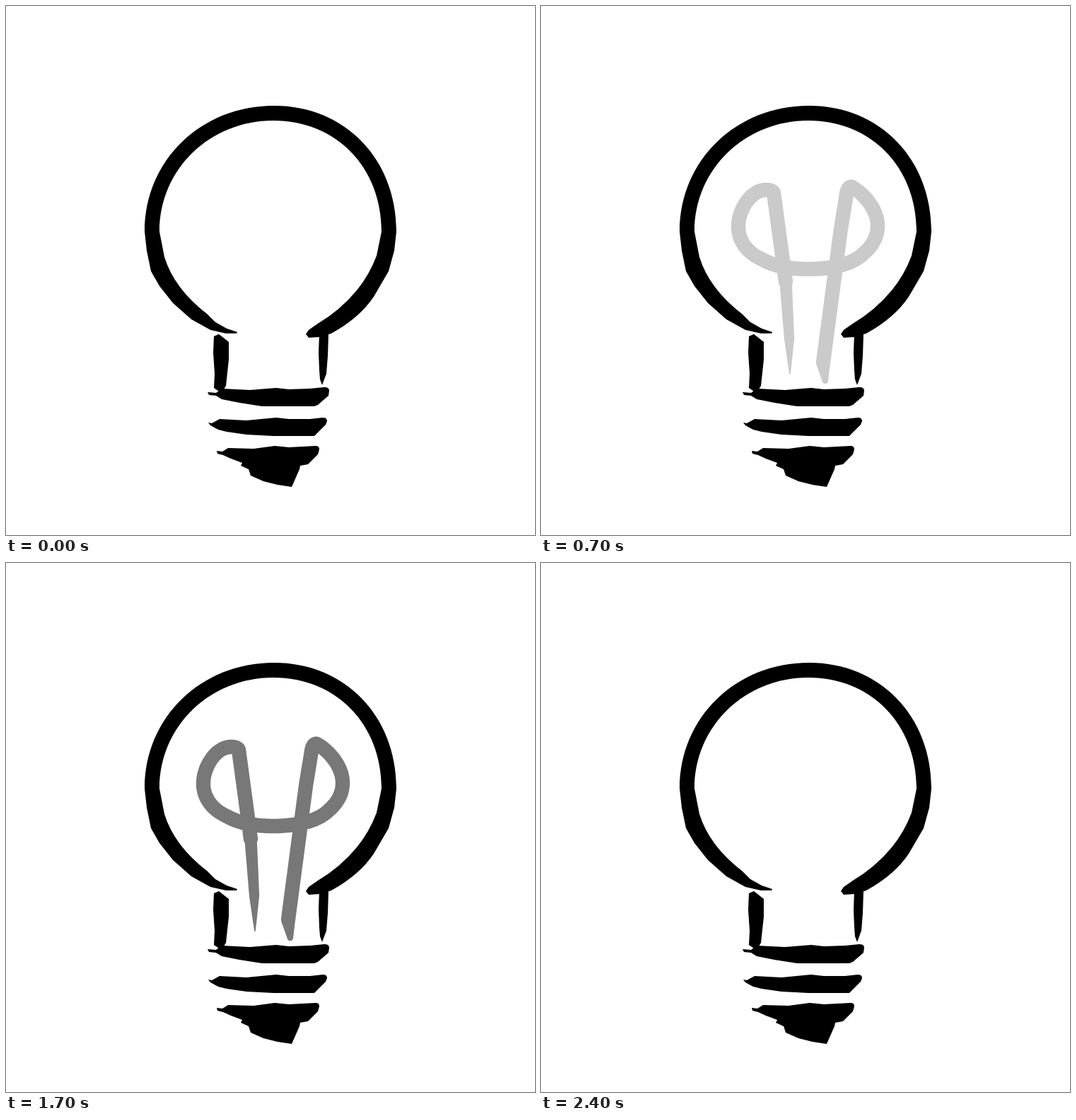
These frames come from a looping animation (748 by 748 pixels, 2.5 s). An HTML page with a canvas:

```html
<!DOCTYPE html>
<html lang="en">
<head>
<meta charset="utf-8">
<title>Light bulb</title>
<style>
html, body { margin: 0; width: 100%; height: 100%; overflow: hidden; background: #fff; }
canvas { display: block; width: 100vw; height: 100vh; }
</style>
</head>
<body>
<canvas id="stage" width="748" height="748"></canvas>
<script>
const ctx = document.getElementById('stage').getContext('2d');
const LOOP = 2500, STEP = 100;
const CX = 374, CY = 319;
const DARK = '#787878', MID = '#a2a2a2', LIGHT = '#cacaca';

// Bulb: glass, neck, screw thread and foot
const bulb = [
  `M326 463 L311 463 L289 458 L262 443 L236 420 L217 396 L205 375 L199 346 L196 319
   C196 218 276 141 379 141 C479 141 552 216 552 319 L549 346 L541 375 L520 411
   Q500 441 460 463 L444 468 L428 469 L424 464 L428 458 L441 449
   Q473 430 496 402 Q514 380 524 353 L531 319
   C531 228 467 162 378 162 C288 162 217 231 217 319
   L224 355 Q238 400 285 436 L296 447 L312 456 L327 461 Z`,
  'M294 467 L301 464 L315 475 L315 500 L311 537 L308 542 L301 545 L294 540 L295 520 L293 490 Z',
  'M443 463 L456 463 L455 495 L453 520 L447 536 L444 528 L443 515 L442 490 Z',
  `M285 546 L297 547 L305 541 L345 543 L382 540 L400 542 L430 541 L450 539 Q457 539 457 544
   L456 551 L441 564 L436 566 L362 566 L330 561 L305 556 L297 551 L287 550 Z`,
  `M286 589 L291 590 L302 584 L340 586 L382 582 L400 584 L430 584 L448 582 Q454 582 454 587
   L452 592 L436 608 L378 608 L340 606 L312 602 L300 599 L289 593 Z`,
  `M298 629 L306 630 L314 625 L350 626 L380 622 L400 624 L438 622 Q443 622 443 627 L441 634
   L427 648 L416 650 L415 655 L404 680 L384 677 L364 672 L346 664 L343 655 L332 650
   L334 646 L318 640 L307 635 L299 633 Z`
].map(d => new Path2D(d));

// Filament, drawn as a brush ribbon along one path
const wire = document.createElementNS('http://www.w3.org/2000/svg', 'path');
wire.setAttribute('d', `M352 520 L351 470 L346 390 L329 264 Q327 260 318 260
  C297 260 279 288 279 312 C279 334 294 350 312 358 C330 368 352 372 378 372
  C408 372 440 366 456 350 C470 338 476 325 476 311 C476 290 460 268 440 256
  Q434 254 432 266 L424 315 L399 504 L402 531`);
const LEN = wire.getTotalLength();
const drawn = [0, 130, 270, 408, 560, 720, LEN];
const erased = [266, 400, 545, 705, LEN];

// Inner end and tip of each ray
const rays = [
  [174, 396, 133, 409], [156, 320, 108, 321], [169, 236, 131, 221],
  [204, 170, 171, 136], [278, 122, 265, 81], [375, 103, 377, 58],
  [472, 123, 487, 82], [549, 174, 580, 140], [582, 238, 620, 226],
  [592, 319, 639, 324], [571, 398, 612, 414]
];
const rayShape = [[0, -7], [0.05, 8], [0.4, 8], [0.68, 6.5], [1, 1.5], [0.97, -1], [0.78, -5.5], [0.6, -7]];

function brush(s) {
  let r = 10.3;
  if (s < 50) r = 1 + s * 0.125;
  else if (s < 130) r = 7.2 + (s - 50) * 0.02;
  return Math.min(r, 4 + (LEN - s) * 0.23);
}

function filament(from, to, color) {
  const ribbon = new Path2D();
  for (let s = from; s <= to; s += 1.5) {
    const p = wire.getPointAtLength(s);
    let { x, y } = p, r = brush(s);
    if (from > 0) {
      // A cut end thins out toward the inside of the curve
      const q = wire.getPointAtLength(s + 1);
      const tx = q.x - p.x, ty = q.y - p.y;
      const thin = Math.min(r, 1.2 + (s - from) * 0.14);
      const shift = (r - thin) * 0.9;
      x += ty * shift;
      y -= tx * shift;
      r = thin;
      if (s === from) {
        ribbon.moveTo(x - tx * 17, y - ty * 17);
        ribbon.lineTo(x + ty * 2, y - tx * 2);
        ribbon.lineTo(x - ty * 2, y + tx * 2);
        ribbon.closePath();
      }
    }
    ribbon.moveTo(x + r, y);
    ribbon.arc(x, y, r, 0, Math.PI * 2);
  }
  ctx.fillStyle = color;
  ctx.fill(ribbon);
}

function outward(x, y, d) {
  const k = 1 + d / Math.hypot(x - CX, y - CY);
  return [CX + (x - CX) * k, CY + (y - CY) * k];
}

function drawRays(k) {
  ctx.fillStyle = LIGHT;
  rays.forEach(([x0, y0, x1, y1], i) => {
    const brief = i % 2 === 1;
    if (brief && k > 3) return;
    // Low rays fly a little farther
    const push = k * k * (1 + Math.max(0, y0 - CY) / 300);
    const [ax, ay] = outward(x0, y0, (brief ? 4 : 2.5) * push);
    const [bx, by] = outward(x1, y1, 1.94 * push);
    const dx = bx - ax, dy = by - ay, len = Math.hypot(dx, dy);
    const side = i < 8 ? 1 : -1;
    ctx.beginPath();
    for (const [u, v] of rayShape) {
      const n = v * side / len;
      ctx.lineTo(ax + dx * u - dy * n, ay + dy * u + dx * n);
    }
    ctx.fill();
  });
}

function render(t) {
  const n = Math.floor((t % LOOP) / STEP);
  ctx.fillStyle = '#fff';
  ctx.fillRect(0, 0, 748, 748);

  if (n > 0 && n < 7) filament(0, drawn[n], DARK);
  else if (n >= 7 && n < 16) filament(0, LEN, LIGHT);
  else if (n >= 16 && n < 20) filament(0, LEN, n === 16 ? MID : DARK);
  else if (n >= 20 && n < 24) filament(erased[n - 20], LEN, DARK);

  if (n >= 10 && n < 16) drawRays(n - 10);

  ctx.fillStyle = '#000';
  bulb.forEach(part => ctx.fill(part));
}

const start = performance.now();
function tick() {
  render(performance.now() - start);
  requestAnimationFrame(tick);
}
tick();
</script>
</body>
</html>
```
